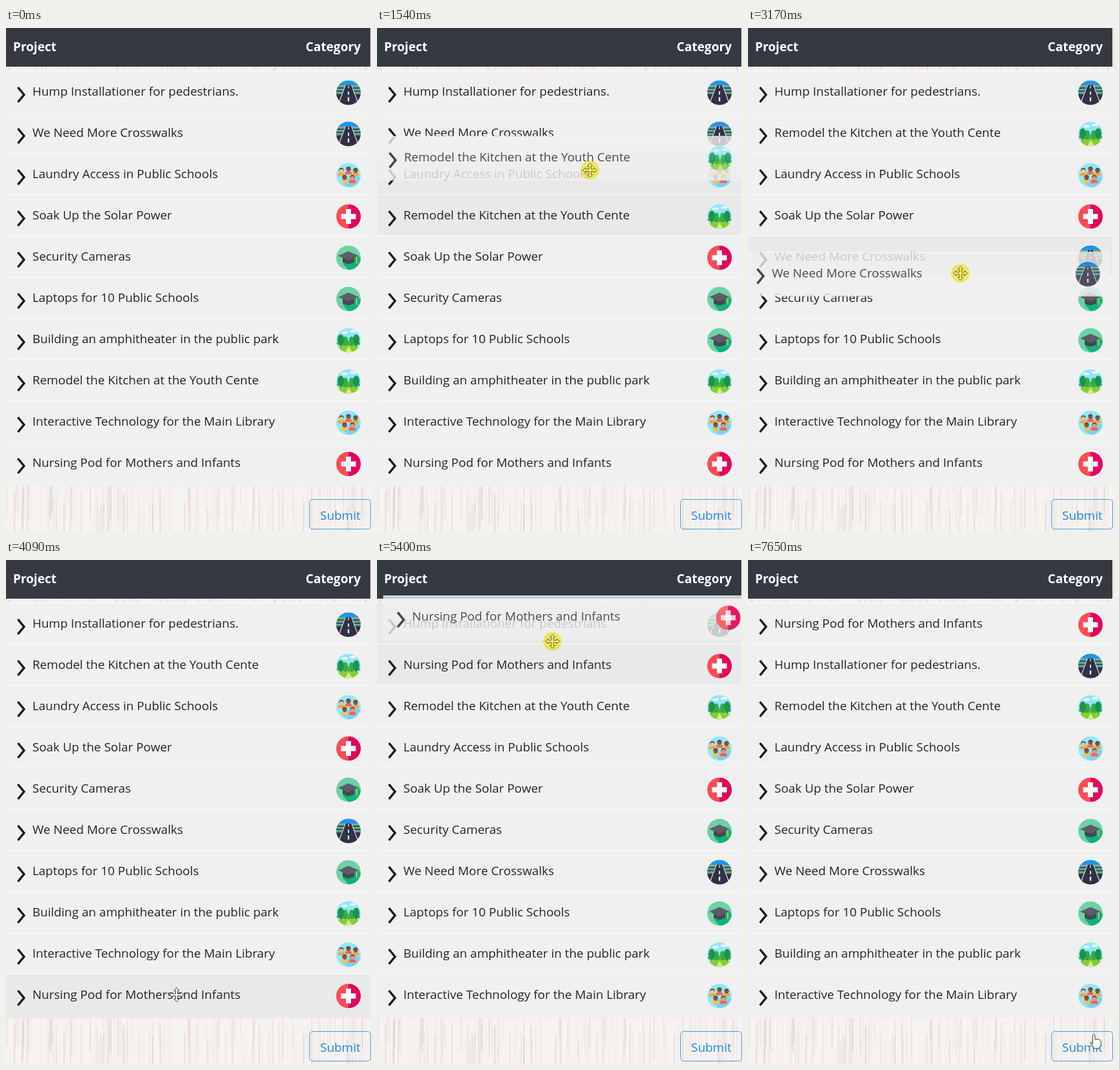
An HTML page with a canvas that plays this animation: 567x782 px, repeating every 7.72 s.

```html
<!DOCTYPE html>
<html lang="en">
<head>
<meta charset="utf-8">
<title>Project ranking</title>
<style>
  html, body { margin: 0; width: 100%; height: 100%; overflow: hidden; background: #f5f2f0; }
  canvas { display: block; }
</style>
</head>
<body>
<canvas id="stage" width="567" height="782"></canvas>
<script>
const W = 567, H = 782, LOOP = 7720, TOP = 66, STEP = 64, ROW_H = 69, LIST_END = 711;
const stage = document.getElementById('stage').getContext('2d');
let g = stage;

const projects = [
  ['Hump Installationer for pedestrians.', road],
  ['We Need More Crosswalks', road],
  ['Laundry Access in Public Schools', people],
  ['Soak Up the Solar Power', health],
  ['Security Cameras', school],
  ['Laptops for 10 Public Schools', school],
  ['Building an amphitheater in the public park', park],
  ['Remodel the Kitchen at the Youth Cente', park],
  ['Interactive Technology for the Main Library', people],
  ['Nursing Pod for Mothers and Infants', health]
];

// The pointer rests between glides and slows down at the end of each one.
const home = { x: 540, y: 748 };
const glides = [
  { start: 150, end: 690, x: 330, y: 542 },
  { start: 970, end: 1770, x: 331, y: 192 },
  { start: 2090, end: 2480, x: 334, y: 163 },
  { start: 2750, end: 3480, x: 329, y: 428 },
  { start: 3710, end: 4250, x: 259, y: 698 },
  { start: 4700, end: 5550, x: 273, y: 108 },
  { start: 5720, end: 6020, x: 272, y: 128 },
  { start: 6650, end: 7700, ...home }
];
const drags = [
  { press: 800, lift: 840, drop: 1940, from: 7, to: 2, grip: 53 },
  { press: 2530, lift: 2700, drop: 3710, from: 1, to: 5, grip: 33 },
  { press: 4400, lift: 4700, drop: 6190, from: 9, to: 0, grip: 71 }
];

function pointerAt(t) {
  let { x, y } = home;
  for (const m of glides) {
    const left = 1 - Math.min(1, Math.max(0, (t - m.start) / (m.end - m.start)));
    const k = 1 - left * left;
    x += (m.x - x) * k;
    y += (m.y - y) * k;
  }
  return { x, y };
}

const rowAt = y => Math.floor((y - TOP) / STEP);

// Moving up, the item is put behind the row under the pointer; moving down, it takes its place.
function slot(d, t, y) {
  if (t >= d.drop) return d.to;
  if (t < d.lift) return d.from;
  return d.to < d.from ? Math.min(d.from, rowAt(y) + 1) : Math.max(d.from, rowAt(y));
}

function box(color, x, y, w, h) {
  g.fillStyle = color;
  g.fillRect(x, y, w, h);
}
function disc(color, x, y, rx, ry = rx) {
  g.fillStyle = color;
  g.beginPath();
  g.ellipse(x, y, rx, ry, 0, 0, 7);
  g.fill();
}
function poly(color, ...p) {
  g.fillStyle = color;
  g.beginPath();
  for (let i = 0; i < p.length; i += 2) g.lineTo(p[i], p[i + 1]);
  g.closePath();
  g.fill();
}
function rounded(color, width, x, y, w, h, r) {
  g.strokeStyle = color;
  g.lineWidth = width;
  g.beginPath();
  g.roundRect(x, y, w, h, r);
  g.stroke();
}
function label(text, x, y, color, align = 'left', font = '18.95px') {
  g.font = `${font} "Open Sans", "Noto Sans", sans-serif`;
  g.textAlign = align;
  g.fillStyle = color;
  g.fillText(text, x, y);
}
const backdrop = color => box(color, -19, -19, 38, 38);

function road() {
  backdrop('#2f3148');
  box('#1c97ee', -19, -19, 38, 8);
  for (let y = -11; y < 2; y += 5) {
    box('#e9e9dc', -19, y, 38, 1.2);
    box('#2ba57c', -19, y + 1.2, 38, 2);
  }
  poly('#e9e0c8', -5, -12, 5, -12, 17, 19, -17, 19);
  poly('#2f3148', -4, -12, 4, -12, 15.5, 19, -15.5, 19);
  for (let i = 0; i < 3; i++) box('#fff', -.6 - i * .3, i * 9 - 11, 1.2 + i * .6, 4 + i);
}
function person(x, y, skin, shirt) {
  g.fillStyle = shirt;
  g.beginPath();
  g.roundRect(x - 5.5, y + 3, 11, 5, [4, 4, 1, 1]);
  g.fill();
  disc('#6b4335', x, y - 1, 3.6);
  disc(skin, x, y + .4, 3);
}
function people() {
  backdrop('#93e7fb');
  poly('#7fd0f2', 8, 0, 19, 4, 19, 19, 0, 19, -10, 11);
  for (let i = -1; i < 2; i++)
    person(i * 11, Math.abs(i) * 2 - 9, i < 0 ? '#f6c28d' : '#8d5436', i ? '#f9a13f' : '#ff6a4c');
  person(-6, 4, '#8d5436', '#ffc24a');
  person(6, 4, '#e79a5c', '#ff5f4c');
}
function health() {
  backdrop('#ff4b55');
  box('#e0045c', 0, -19, 19, 38);
  box('#fff', -4, -11.5, 8, 23);
  box('#fff', -11.5, -4, 23, 8);
}
function school() {
  backdrop('#6dd2a5');
  poly('#0cb47c', 15, -3, 19, 1, 19, 19, 0, 19, -9, 9);
  poly('#47474f', -9, -1, 9, -1, 9, 7, 0, 10, -9, 7);
  poly('#5c5d67', 0, -10, 16, -3, 0, 4, -16, -3);
  box('#f4bd35', 12, -2, 1.6, 11);
}
function park() {
  backdrop('#92e5fa');
  disc('#e4fbff', -6, -12, 5, 2);
  disc('#e4fbff', 7, -14, 5, 2);
  disc('#3fb54a', 0, 5, 19, 4);
  for (const side of [-1, 1]) {
    box('#7a5a35', side * 5 - .7, 4, 1.4, 5);
    disc('#2fae4a', side * 5, 0, 4, 6);
    box('#7a5a35', side * 12 - 1, 5, 2, 6);
    disc('#1b9348', side * 12, -1, 5, 8);
  }
  disc('#86cf2e', 0, 17, 22, 9);
  poly('#d3ed8c', 0, 9, 6, 19, -5, 19);
}

function row([text, icon], x, y, color) {
  g.save();
  g.translate(x, y);
  box(color, -4, 0, 570, ROW_H);
  box('#fbfbfb', -4, 0, 570, 1);
  g.lineWidth = 3.5;
  g.strokeStyle = '#1c1a1e';
  g.beginPath();
  g.moveTo(18.5, 26);
  g.lineTo(28, 37.5);
  g.lineTo(18.5, 49);
  g.stroke();
  label(text, 41, 39, '#212529');
  g.translate(532, 34.5);
  g.beginPath();
  g.arc(0, 0, 19, 0, 7);
  g.clip();
  icon();
  g.restore();
}

function moveCursor() {
  g.beginPath();
  for (let i = 0; i < 4; i++) {
    g.lineTo(-1.6, -1.6);
    g.lineTo(-1.6, -6.5);
    g.lineTo(-4, -6.5);
    g.lineTo(0, -11);
    g.lineTo(4, -6.5);
    g.lineTo(1.6, -6.5);
    g.rotate(Math.PI / 2);
  }
  g.closePath();
}
function handCursor() {
  g.beginPath();
  g.moveTo(-4, 4);
  g.lineTo(-4, -9);
  g.quadraticCurveTo(-2.2, -13, -.5, -9);
  g.lineTo(-.5, -3);
  g.quadraticCurveTo(9, -4, 9, 2);
  g.quadraticCurveTo(9, 7, 6, 11);
  g.lineTo(-2, 11);
  g.quadraticCurveTo(-4, 7, -7, 3);
  g.quadraticCurveTo(-7, 0, -4, 4);
}
function cursor(x, y, pressed) {
  g.save();
  g.translate(x, y);
  (y < LIST_END ? moveCursor : handCursor)();
  g.fillStyle = '#fff';
  g.fill();
  g.strokeStyle = pressed ? '#55555a' : '#25252b';
  g.lineWidth = .9;
  g.stroke();
  if (pressed) {
    g.globalCompositeOperation = 'multiply';
    disc('#fff66c', 0, 0, 14.5);
  }
  g.restore();
}

// Pale wooden boards with fine vertical grain, painted once.
function paintWood() {
  const c = document.createElement('canvas');
  c.width = W;
  c.height = H;
  g = c.getContext('2d');
  box('#f5f2f0', 0, 0, W, H);
  let seed = 11;
  const rnd = () => (seed = seed * 16807 % 2147483647) / 2147483647;
  for (const [top, height] of [[58, 10], [LIST_END, 71]])
    for (let i = 0; i < 260; i++) {
      const tone = rnd() < .5 ? '255,255,255' : '190,172,162';
      box(`rgba(${tone},${.05 + rnd() * .25})`, rnd() * W, top + (rnd() - .5) * height, .5 + rnd() * 1.8, height);
    }
  for (let x = 28; x < W; x += 62)
    box('rgba(150,130,120,.22)', x + rnd() * 14, LIST_END, 1, 71);
  g = stage;
  return c;
}
const wood = paintWood();

function draw(t) {
  const { x, y } = pointerAt(t);
  const order = projects.slice();
  let active = null, at = -1;
  for (const d of drags) {
    if (t < d.press) break;
    const i = slot(d, t, y);
    order.splice(i, 0, order.splice(d.from, 1)[0]);
    if (t < d.drop) { active = d; at = i; }
  }
  const moved = active && at !== active.from;
  const hover = t >= 150 && y < LIST_END ? Math.min(9, rowAt(y)) : -1;

  g.drawImage(wood, 0, 0);
  box('#343a40', 0, 0, 566, 60);
  box('#40353f', 0, 58, 566, 2);
  label('Project', 11, 36, '#fff', 'left', 'bold 19.1px');
  label('Category', 551, 36, '#fff', 'right', 'bold 19.1px');

  order.forEach((p, i) =>
    row(p, 0, TOP + STEP * i, i === hover || moved && i === at ? '#e9e9ea' : '#f0f0f0'));

  rounded('#479be0', 1, 471.5, 731.5, 95, 46, 5);
  label('Submit', 488, 763, '#1a84ee');

  if (active) {
    if (!moved) rounded('#101010', 2, -4, TOP + STEP * at, 570, ROW_H, 3);
    if (t >= active.lift) {
      g.globalAlpha = .8;
      row(order[at], x - pointerAt(active.press).x, y - active.grip, '#f0f0f0');
      g.globalAlpha = 1;
    }
  }
  if (t >= 150) cursor(x, y, active);
}

const start = performance.now();
function tick() {
  draw((performance.now() - start) % LOOP);
  requestAnimationFrame(tick);
}
tick();
</script>
</body>
</html>
```
